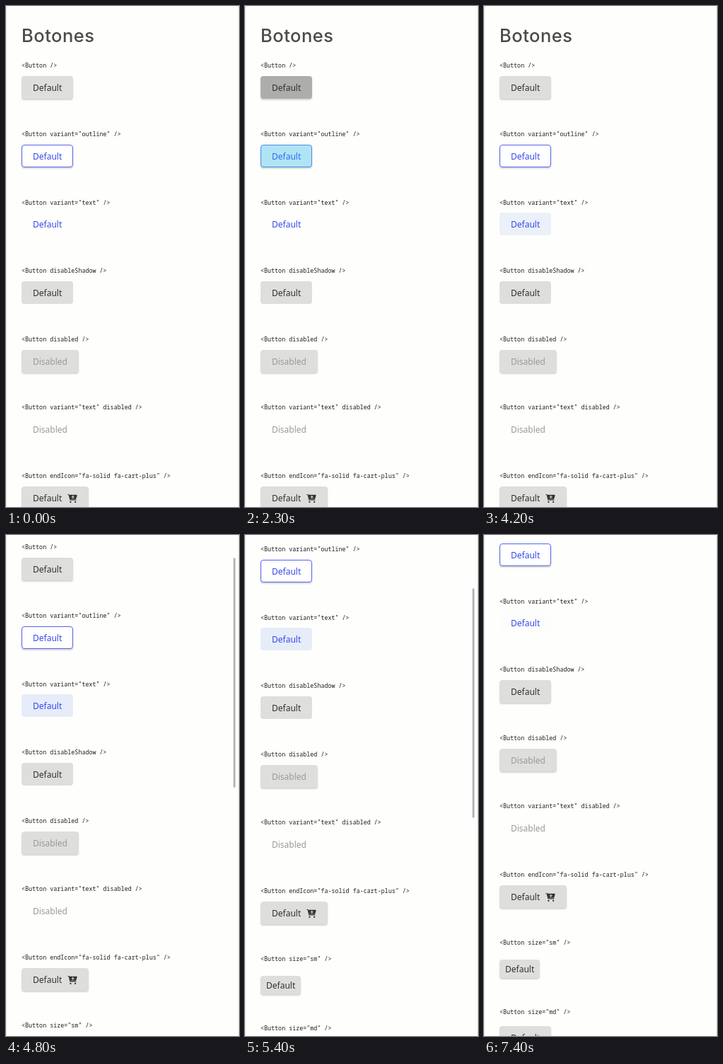
An HTML page for the animation above (8000 ms loop, 330 by 708 pixels).

```html
<!DOCTYPE html>
<html lang="es">
<head>
<meta charset="utf-8">
<title>Botones</title>
<style>
  @property --scroll { syntax: "<integer>"; inherits: true; initial-value: 0; }

  html, body { margin: 0; width: 100%; height: 100%; overflow: hidden; }

  #stage {
    position: relative; width: 330px; height: 708px; overflow: hidden;
    box-sizing: border-box; background: #fefffc;
    border: solid #e7e7e6; border-width: 0 1px;
    animation: scroll 8s linear infinite paused;
  }
  #page { position: absolute; inset: 0; transform: translateY(calc(var(--scroll) * -1px)); }
  #page > * { position: absolute; left: 21px; margin: 0; white-space: pre; }

  h1 { top: 27px; font: 500 25.5px/30px Inter, sans-serif; letter-spacing: .5px; color: #4a4a48; }
  code { font: 8.4px/12px "Noto Sans Mono", monospace; color: #1f1f1f; }

  .button {
    display: flex; align-items: center; gap: 8px;
    box-sizing: border-box; height: 32px; padding: 2px 16px 0; border-radius: 4px;
    font: 12px/16px "Noto Sans", sans-serif; color: #303030;
    background: #dedfdc; box-shadow: 0 2px 2px rgba(51, 51, 51, .2);
  }
  .outline { padding: 2px 15px 0; border: 1px solid #5462f2; background: #fff; color: #3548ea; }
  .text { background: none; box-shadow: none; color: #3548ea; }
  .flat { box-shadow: none; }
  .disabled { color: #999a98; }
  .small { height: 26px; padding: 2px 8px 0; }
  svg { width: 14px; height: 12px; }

  #thumb {
    position: absolute; left: 321px; top: 2px; width: 3px; height: 324px;
    background: #b8b8b7; opacity: 0;
    transform: translateY(calc(var(--scroll) * .457px));
    animation: thumb 8s linear infinite paused;
  }

  .hover-fill { animation: fill 8s linear infinite paused; }
  .hover-outline { animation: outline 8s linear infinite paused; }
  .hover-text { animation: text 8s linear infinite paused; }
  .hover-flat { animation: flat 8s linear infinite paused; }

  @keyframes scroll {
    0%, 53.75% { --scroll: 0; animation-timing-function: cubic-bezier(.4, 0, .8, .8); }
    60% { --scroll: 67; }
    65% { --scroll: 121; animation-timing-function: cubic-bezier(.3, .35, .7, 1); }
    70%, 100% { --scroll: 184; }
  }
  @keyframes thumb {
    0%, 53.7% { opacity: 0; }
    54.5%, 75.2% { opacity: 1; }
    77.5%, 100% { opacity: 0; }
  }
  @keyframes fill {
    0%, 12% { background: #dedfdc; }
    18.75%, 31% { background: #adadaa; }
    36.25%, 100% { background: #dedfdc; }
  }
  @keyframes outline {
    0%, 28.7% { background: #fff; border-color: #5462f2; color: #3548ea; }
    28.71%, 31% { background: #b0e4f4; border-color: #4a8af0; color: #2d6ff6; }
    37.5%, 100% { background: #fff; border-color: #5462f2; color: #3548ea; }
  }
  @keyframes text {
    0%, 44% { background: #ebf0f900; }
    49%, 52.5% { background: #ebf0f9; }
    58%, 82% { background: #e6edf9; }
    90%, 100% { background: #fdfdfc; }
  }
  @keyframes flat {
    0%, 84% { box-shadow: 0 2px 2px rgba(51, 51, 51, 0); }
    90%, 100% { box-shadow: 0 2px 2px rgba(51, 51, 51, .2); }
  }
</style>
</head>
<body>
<div id="stage">
  <div id="page"><h1>Botones</h1></div>
  <div id="thumb"></div>
</div>
<script>
  const DURATION = 8000, STEP = 100, PITCH = 96.6;
  const page = document.getElementById("page");

  const cart = `<svg viewBox="0 0 576 512" fill="#303030" stroke-width="44" stroke-linecap="round" stroke-linejoin="round">
    <path d="M92 32H541q34 2 30 40L518 258q-8 30-38 30H150z"/>
    <path d="M24 24H80L150 336H500" fill="none" stroke="#303030"/>
    <path d="M320 88v144M248 160h144" fill="none" stroke="#dedfdc"/>
    <circle cx="176" cy="464" r="48"/><circle cx="464" cy="464" r="48"/></svg>`;

  function add(tag, className, top) {
    const el = document.createElement(tag);
    el.className = className;
    el.style.top = Math.round(top) + "px";
    return page.appendChild(el);
  }

  function row(props, classes, caption, icon, labelTop, buttonTop) {
    add("code", "", labelTop).textContent = `<Button ${props}${props && " "}/>`;
    add("div", "button " + classes, buttonTop).innerHTML = `<span>${caption}</span>${icon}`;
  }

  [
    ["", "hover-fill"],
    ['variant="outline"', "outline hover-outline"],
    ['variant="text"', "text hover-text"],
    ["disableShadow", "flat hover-flat"],
    ["disabled", "disabled", "Disabled"],
    ['variant="text" disabled', "text disabled", "Disabled"],
    ['endIcon="fa-solid fa-cart-plus"', "", "Default", cart],
  ].forEach(([props, classes, caption = "Default", icon = ""], i) =>
    row(props, classes, caption, icon, 78.4 + PITCH * i, 99.2 + PITCH * i));
  row('size="sm"', "small", "Default", "", 754, 784);
  row('size="md"', "", "Default", "", 852, 878);

  // All keyframes share one clock that ticks every STEP ms.
  const animations = document.getAnimations();
  function tick(now) {
    const time = Math.floor(now % DURATION / STEP) * STEP;
    animations.forEach(a => { a.currentTime = time; });
    requestAnimationFrame(tick);
  }
  requestAnimationFrame(tick);
</script>
</body>
</html>
```
